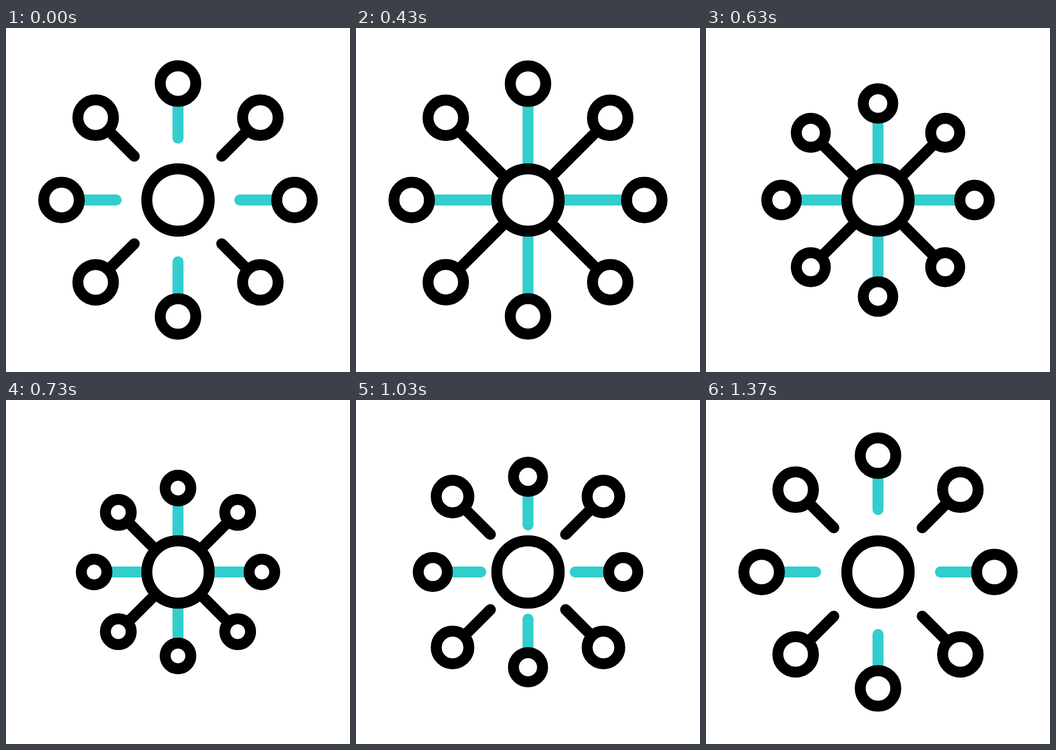
An HTML page with a canvas for the animation above (1670 ms loop, 640 by 640 pixels).

```html
<!DOCTYPE html>
<html lang="en">
<head>
<meta charset="utf-8">
<title>Hub and nodes</title>
<style>
html, body { margin: 0; height: 100%; overflow: hidden; background: #fff; }
canvas { display: block; width: 100vmin; height: 100vmin; }
</style>
</head>
<body>
<canvas width="640" height="640"></canvas>
<script>
const ctx = document.querySelector('canvas').getContext('2d');
const LOOP = 1670, LAST_STEP = 41;
const HUB = 58, NODE = 33.1, REACH = 216.7, REST_LENGTH = 0.536;

// Times are in steps of 1/30 s.
const straight = {
  color: '#32cdcd', depth: 0.335, start: 12.5, turn: 25.3, end: 41.5,
  retract: { start: 22.5, end: 42, power: 2.08 }
};
const diagonal = {
  color: '#000', depth: 0.29, start: 12.5, turn: 23.5, end: 36.75,
  retract: { start: 24.4, end: 39.5, power: 2.82 }
};

const progress = (k, from, to) => Math.min(1, Math.max(0, (k - from) / (to - from)));
const easeInOut = x => x * x * (3 - 2 * x);

// Cubic Bezier (1/3, 0, 5/6, 5/6): eases in, then leaves at constant speed.
function easeIn(x) {
  let low = 0, high = 1;
  for (let i = 0; i < 24; i++) {
    const p = (low + high) / 2;
    if (p + p * p * (1 - p) / 2 < x) low = p; else high = p;
  }
  return low * low * (2.5 - 1.5 * low);
}

function nodeScale(k, { depth, start, turn, end }) {
  const pull = k < turn ? easeInOut(progress(k, start, turn))
                        : easeIn(1 - progress(k, turn, end));
  return 1 - depth * pull;
}

function lineLength(k, { start, end, power }) {
  const grown = k < start ? easeInOut(progress(k, -1, 10.5))
                          : (1 - progress(k, start, end)) ** power;
  return REST_LENGTH + (1 - REST_LENGTH) * grown;
}

function ring(x, radius) {
  ctx.beginPath();
  ctx.arc(x, 0, radius, 0, Math.PI * 2);
  ctx.strokeStyle = '#000';
  ctx.fill();
  ctx.stroke();
}

function arm(k, angle, style) {
  const scale = nodeScale(k, style);
  const outer = (REACH - NODE) * scale;
  const inner = outer - (outer - HUB) * lineLength(k, style.retract);
  ctx.save();
  ctx.rotate(angle);
  ctx.beginPath();
  ctx.moveTo(REACH * scale, 0);
  ctx.lineTo(inner, 0);
  ctx.strokeStyle = style.color;
  ctx.stroke();
  ring(REACH * scale, NODE * scale);
  ctx.restore();
}

function draw() {
  const time = performance.now() % LOOP;
  const k = Math.min(LAST_STEP, Math.floor((time + 4) * 0.03));
  ctx.setTransform(1, 0, 0, 1, 320, 320);
  ctx.fillStyle = '#fff';
  ctx.fillRect(-320, -320, 640, 640);
  ctx.lineWidth = 20.4;
  ctx.lineCap = 'round';
  for (let i = 0; i < 8; i++) arm(k, i * Math.PI / 4, i % 2 ? diagonal : straight);
  ring(0, HUB);
  requestAnimationFrame(draw);
}
draw();
</script>
</body>
</html>
```
